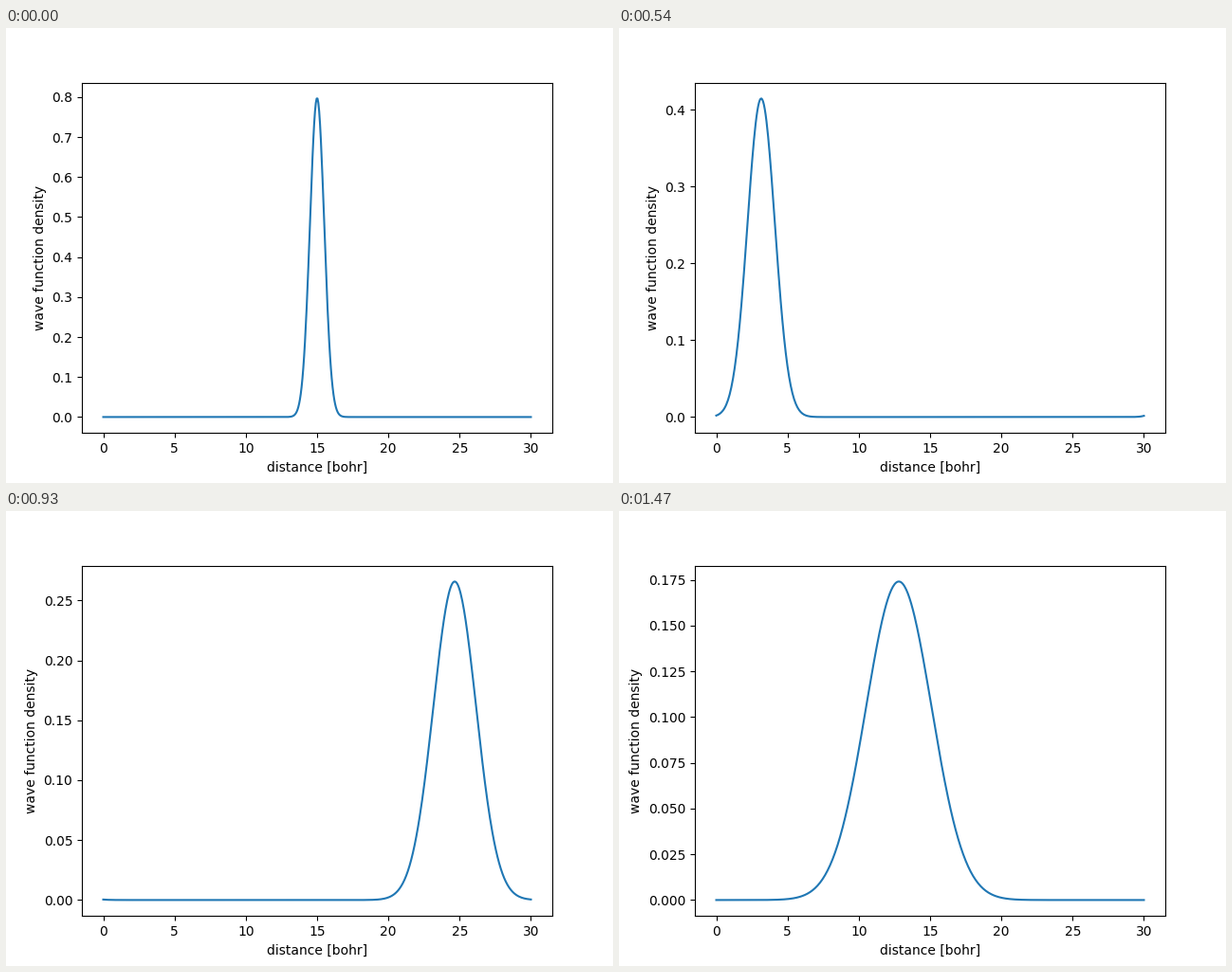
Animation, 640 px wide and 480 px high, one loop 1.5 s. Source, as a matplotlib script:

```python
import numpy as np
import matplotlib.pyplot as plt
from matplotlib.animation import FuncAnimation

FRAMES, INTERVAL = 50, 30
LENGTH, POINTS = 30.0, 512
START, WIDTH = 15.0, 0.5
SPEED = 0.6582    # bohr per frame, moving left
SPREAD = 0.0913   # dispersion rate per frame

x = np.linspace(0, LENGTH, POINTS)
dx = x[1] - x[0]
period = POINTS * dx


def density(frame):
    """Free Gaussian packet on a periodic grid, normalised over the box."""
    sigma = WIDTH * np.hypot(1, SPREAD * frame)
    offset = x - (START - SPEED * frame)
    rho = sum(np.exp(-0.5 * ((offset - n * period) / sigma) ** 2)
              for n in (-1, 0, 1, 2))
    area = dx * (rho.sum() - 0.5 * (rho[0] + rho[-1]))
    return rho / area


fig, ax = plt.subplots(figsize=(6.4, 4.8), dpi=100)
line, = ax.plot(x, density(0))
ax.set_xlabel("distance [bohr]")
ax.set_ylabel("wave function density")


def update(frame):
    line.set_ydata(density(frame))
    ax.relim()
    ax.autoscale_view()
    return line,


anim = FuncAnimation(fig, update, frames=FRAMES, interval=INTERVAL,
                     repeat=True, repeat_delay=0, blit=False)
plt.show()
```
